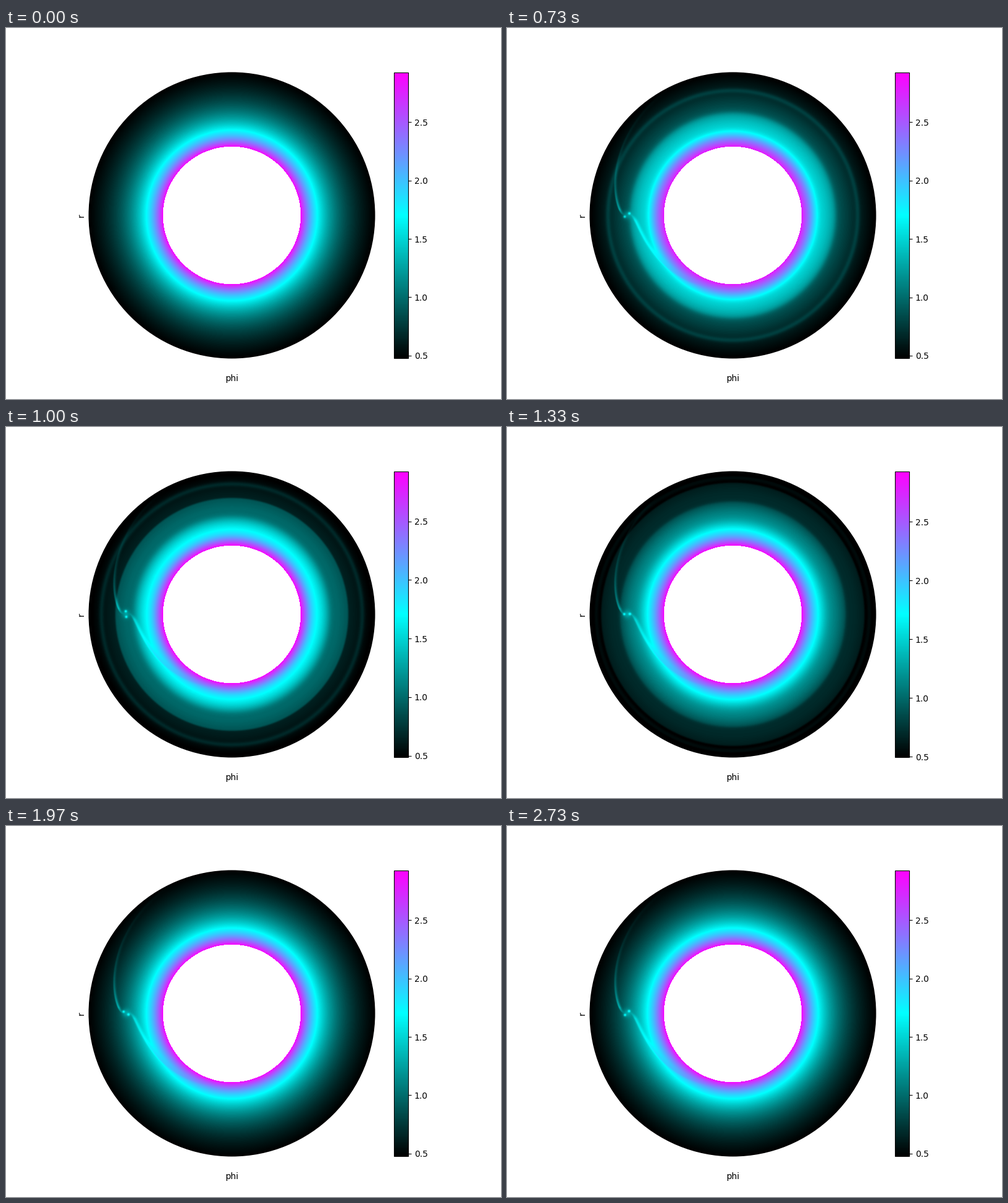
Recreate the animation shown at these times as a matplotlib script. Size 800 by 600 pixels, loop 2.76 s.

```python
import numpy as np
import matplotlib.pyplot as plt
from matplotlib.animation import FuncAnimation
from matplotlib.colors import LinearSegmentedColormap
from matplotlib.patches import Circle

W, H, FRAMES, LOOP = 800, 600, 83, 2760
R_IN, R_OUT, V_MAX = 111.3, 231, 2.926
SPEED = 2.45  # pulse speed, pixels per frame
SPIN = 26.7   # turn of the binary, degrees per frame


def ramp(v, start, end):
    return np.clip((v - start) / (end - start), 0, 1)


def ridge(d, inside, outside):
    return np.exp(-(d / np.where(d > 0, outside, inside)) ** 2)


axis = np.arange(2 * R_OUT) + 0.5 - R_OUT
X, Y = np.meshgrid(axis, -axis)
R = np.hypot(X, Y)
PHI = np.degrees(np.arctan2(Y, -X))  # measured from the binary
HOLE = (R < R_IN) | (R > R_OUT)
BASE = 0.478 * (R_OUT / np.maximum(R, R_IN)) ** 2.47


def pulse(age):
    """Front that leaves the inner edge and steepens on its way out."""
    edge = R_IN + SPEED * age
    s = R - edge
    soft = max(7 - 0.2 * age, 0.7)
    front = 1 / (1 + np.exp(np.clip(s / soft, -50, 50)))
    behind = (0.15 * np.exp(np.minimum(s, 0) / 14)
              - 0.09 * np.exp(-((s + 27) / 10) ** 2))
    ahead = -0.18 * ramp(age, 10, 23) * np.exp(-np.maximum(s, 0) / 20)
    fade = ramp(age, 2, 9) * ramp(edge, R_OUT, R_OUT - 25)
    return (front * behind + (1 - front) * ahead) * fade


def crest(n):
    ring = 0.2 * np.exp(-((R - 181 - n) / 3.8) ** 2)
    return ring * ramp(n, 13, 21) * ramp(n, 50, 35)


def arms(n):
    reach = 10 + 3 * n
    a, b = np.maximum(PHI, 0), np.maximum(-PHI, 0)
    outer = (0.65 * np.exp(-a / 22) * ridge(R - 176 - 3.73 * a ** 0.64, 2.8, 1.5)
             * ramp(PHI, 0, 3) * ramp(a, 80, 55) * ramp(a, reach, reach - 15))
    inner = (0.28 * np.exp(-b / 28) * ridge(R - 164 + 3.03 * b ** 0.62, 3.5, 2)
             * ramp(PHI, 1, -3) * ramp(b, 80, 55) * ramp(b, reach, reach - 15))
    return (outer + inner) * ramp(n, 0, 8)


def binary(n):
    cx, cy = -171, 0.5
    ang = np.radians(28 + SPIN * (n - 14))
    dx, dy = 4.6 * np.cos(ang), 4.6 * np.sin(ang)
    glow = 0.25 * np.exp(-((X - cx) ** 2 + (Y - cy) ** 2) / 45)
    for sign in (1, -1):
        d2 = (X - cx - sign * dx) ** 2 + (Y - cy - sign * dy) ** 2
        glow += 0.6 * np.exp(-d2 / 4.5)
    return glow * ramp(n, 0, 10)


def density(n):
    waves = pulse(n + 1.4) + 0.5 * pulse(n - 11) + crest(n)
    field = BASE * (1 + waves + arms(n)) + binary(n)
    return np.ma.array(field, mask=HOLE)


def v_min(n):
    return 0.477 + 0.021 * np.exp(-((n - 38) / 10) ** 2)


def pixel_axes(x, y, w, h):
    return fig.add_axes([x / W, 1 - (y + h) / H, w / W, h / H])


def label(x, y, text, **kw):
    fig.text(x / W, 1 - y / H, text, ha="center", va="center", fontsize=10, **kw)


plt.rcParams["font.family"] = "DejaVu Sans"
fig = plt.figure(figsize=(W / 100, H / 100), dpi=100, facecolor="white")

disc = pixel_axes(134, 72, 2 * R_OUT, 2 * R_OUT)
disc.axis("off")
cmap = LinearSegmentedColormap.from_list("disc", ["black", "cyan", "magenta"])
image = disc.imshow(density(0), cmap=cmap, interpolation="nearest",
                    extent=(-R_OUT, R_OUT, -R_OUT, R_OUT),
                    vmin=v_min(0), vmax=V_MAX)
disc.add_patch(Circle((0, 0), R_OUT, fill=False, ec="black", lw=0.8,
                      clip_on=False))

fig.colorbar(image, cax=pixel_axes(627, 72, 23.1, 462),
             ticks=np.arange(0.5, 2.6, 0.5), format="%.1f")
label(365, 566.5, "phi")
label(121.5, 303.5, "r", rotation=90)


def update(n):
    image.set_data(density(n))
    image.set_clim(v_min(n), V_MAX)
    return [image]


anim = FuncAnimation(fig, update, frames=FRAMES, interval=LOOP / FRAMES,
                     repeat=True, repeat_delay=0, blit=False)
plt.show()
```
